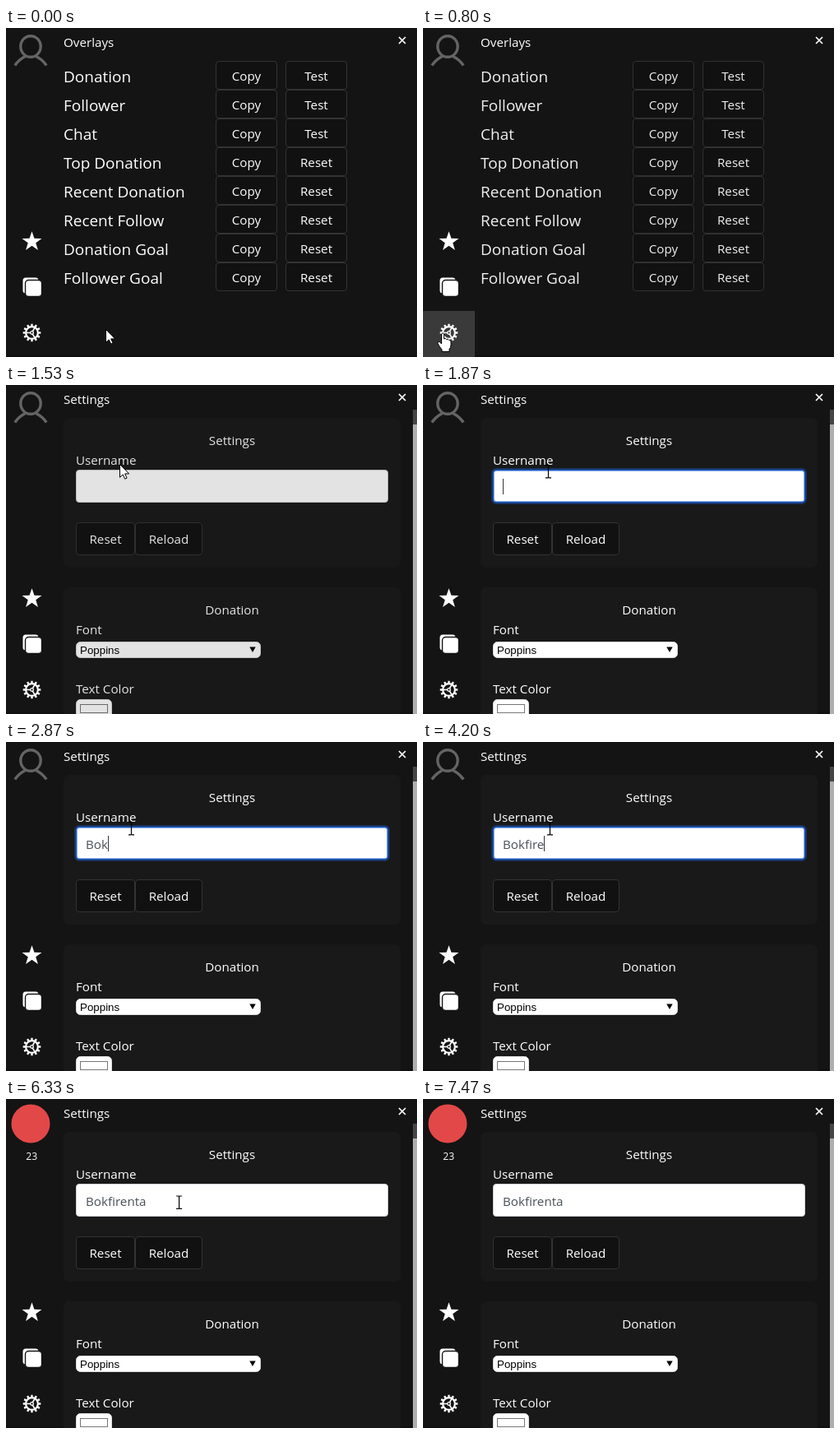
These frames come from a looping animation (500x400 px, 8.14 s). An HTML page:

```html
<!DOCTYPE html>
<html lang="en">
<head>
<meta charset="utf-8">
<title>Overlay settings</title>
<style>
  html, body { margin: 0; width: 100%; height: 100%; overflow: hidden; background: #141414; }
  svg { display: block; width: 500px; height: 400px; }
  text { font-family: "Open Sans", "Noto Sans", sans-serif; font-size: 15.2px; fill: #fff; }
  .mid { text-anchor: middle; }
  .label { font-size: 19px; }
  .btn { fill: #111; stroke: #333; }
  .card { fill: #191919; }
  .pen { fill: none; stroke: #fff; }
  .pointer { fill: #fff; stroke: #000; stroke-width: 1; stroke-linejoin: round; }
</style>
</head>
<body>
<svg viewBox="0 0 500 400">
  <rect width="500" height="400" fill="#141414"/>
  <rect y="398" width="500" height="2" fill="#0f0f0f"/>
  <rect id="hover" y="344" width="63" height="56" fill="#3a3a3a"/>

  <g id="guest" fill="none" stroke="#646464" stroke-width="3.4">
    <ellipse cx="30" cy="22.5" rx="12.2" ry="12.8"/>
    <path d="M10.8 45.5Q16 38 23.5 34.5M49.2 45.5Q44 38 36.5 34.5"/>
  </g>
  <circle id="avatar" cx="30" cy="30" r="23.5" fill="#e34848"/>
  <text id="count" class="mid" x="31.2" y="74" style="font-size:12.2px">23</text>

  <path id="star" fill="#fff"/>
  <rect x="20.5" y="303.5" width="19" height="19" rx="3.5" fill="#fff"/>
  <rect x="23.5" y="306.5" width="20" height="20" rx="4" fill="#fff" stroke="#141414" stroke-width="1.4"/>
  <g class="pen" transform="translate(31.5 370.5)">
    <circle r="7.4" stroke-width="2.2"/>
    <path id="teeth" stroke-width="2.4"/>
    <path id="spokes" stroke-width="1.7"/>
    <circle r="1.8" stroke-width="1.3"/>
  </g>
  <path class="pen" stroke-width="1.7" d="M478 11l8 8M486 11l-8 8"/>
  <text id="title" x="70" y="23"></text>

  <g id="overlays"></g>

  <g id="settings">
    <rect class="card" x="70" y="40" width="410" height="182" rx="7"/>
    <rect class="card" x="70" y="246" width="410" height="170" rx="7"/>
    <text class="mid" x="275" y="73">Settings</text>
    <text x="85" y="97">Username</text>
    <g id="glow" fill="none">
      <rect x="83.5" y="101.5" width="383" height="43" rx="5" stroke="#1b4fae" stroke-opacity=".45"/>
    </g>
    <rect id="field" x="85.5" y="103.5" width="379" height="39" rx="3.5" fill="#fff"/>
    <text id="name" x="97" y="130" style="fill:#495057"></text>
    <rect id="caret" y="114" width="1" height="19" fill="#30363c"/>
    <g id="actions"></g>
    <text class="mid" x="275" y="279">Donation</text>
    <text x="85" y="303">Font</text>
    <rect x="85.5" y="312.5" width="224" height="19" rx="5" fill="#fff" stroke="#ddd"/>
    <text x="90" y="327" style="font:13.333px 'Liberation Sans',Arial,sans-serif;fill:#000">Poppins</text>
    <path d="M296.3 318.5h7.4l-3.7 6.6z"/>
    <text x="85" y="375">Text Color</text>
    <rect x="85.5" y="382.5" width="43" height="30" rx="5" fill="#fff" stroke="#ddd"/>
    <rect x="90.5" y="388.5" width="33" height="10" fill="#fff" stroke="#777"/>
  </g>
  <g id="scroll">
    <rect x="495" y="30" width="5" height="18" fill="#454545"/>
    <rect x="495" y="48" width="5" height="352" fill="#aeaeae"/>
  </g>

  <g id="cursor">
    <path id="arrow" class="pointer" d="M.5 .5V16.3L4.2 12.9L6.7 18.2L9.1 17.1L6.7 11.9H11.7Z"/>
    <path id="beam" fill="none" stroke="#000" stroke-width="1.2" d="M-3.5-7.5h2.5q1 0 1 1q0-1 1-1h2.5M0-7V7.5M-3.5 7.8h2.5q1 0 1-1q0 1 1 1h2.5"/>
    <path id="hand" class="pointer" d="M-1.5 13V1Q0-1.5 1.6 1V7Q3.5 5.5 4.6 7.6Q6.6 6.4 7.6 8.5Q9.8 7.8 10 10V15Q9.6 18 8 19.5V22.5H-1V20Q-4.5 16-6 12.5Q-6.3 10-4 10.3Z"/>
  </g>
</svg>
<script>
const LOOP = 8140, STEP = 1000 / 15;
const USER = "Bokfirenta";
const KEYS = [2600, 2800, 2870, 3130, 3400, 3470, 4200, 4330, 4470, 4530];
const FOCUS = 1860, BLUR = 5460, BLINK = 530;
const SWITCH = 1315;

// time, x, y, eased on the way in
const PATH = [
  [0, 121, 366], [200, 121, 366], [600, 24, 371, 1], [867, 24, 371],
  [1267, 124, 181], [1533, 138, 96], [1600, 146, 89], [1733, 152.5, 105],
  [3700, 152.5, 105], [3733, 154.5, 105], [4867, 154.5, 105],
  [5200, 334, 174, 1], [6133, 334, 174], [6600, 21, 51, 1],
  [6933, 21, 51], [7440, 88, 359, 1], [LOOP, 88, 359]
];

const $ = id => document.getElementById(id);
const clamp = v => Math.max(0, Math.min(1, v));
const show = (id, on) => $(id).setAttribute("visibility", on ? "visible" : "hidden");
const polar = (r, deg) => {
  const a = deg * Math.PI / 180;
  return (r * Math.sin(a)).toFixed(2) + " " + (-r * Math.cos(a)).toFixed(2);
};
const rays = (n, r0, r1, turn) =>
  Array.from({ length: n }, (_, i) => `M${polar(r0, turn + i * 360 / n)}L${polar(r1, turn + i * 360 / n)}`).join("");
const button = (x, y, w, h, s) =>
  `<rect class="btn" x="${x + .5}" y="${y + .5}" width="${w - 1}" height="${h - 1}" rx="3.5"/>` +
  `<text class="mid" x="${x + w / 2}" y="${y + h / 2 + 6}">${s}</text>`;

function build() {
  const rows = ["Donation", "Follower", "Chat", "Top Donation", "Recent Donation",
    "Recent Follow", "Donation Goal", "Follower Goal"];
  $("overlays").innerHTML = rows.map((s, i) => {
    const y = 40 + 35 * i;
    return `<text class="label" x="70" y="${y + 26}">${s}</text>` +
      button(255, y, 75, 35, "Copy") + button(340, y, 75, 35, i < 3 ? "Test" : "Reset");
  }).join("");
  $("actions").innerHTML = button(85, 167, 72, 40, "Reset") + button(157, 167, 82, 40, "Reload");
  $("star").setAttribute("d", "M" + Array.from({ length: 10 }, (_, i) => polar(i % 2 ? 5 : 12.6, i * 36)).join("L") + "Z");
  $("star").setAttribute("transform", "translate(31.5 259.8)");
  $("teeth").setAttribute("d", rays(12, 8, 10.8, 0));
  $("spokes").setAttribute("d", rays(3, 1.8, 7, 30));
}

function cursorAt(t) {
  let i = 1;
  while (i < PATH.length - 1 && PATH[i][0] < t) i++;
  const [t0, x0, y0] = PATH[i - 1], [t1, x1, y1, eased] = PATH[i];
  let k = clamp((t - t0) / (t1 - t0));
  if (eased) k = k * k * (3 - 2 * k);
  return [x0 + (x1 - x0) * k, y0 + (y1 - y0) * k];
}

function drawCursor(t) {
  const [x, y] = cursorAt(t);
  const overGear = x < 63 && y > 344;
  const overField = t > SWITCH && x > 85 && x < 465 && y > 103 && y < 143;
  const seen = t < 7460;
  $("cursor").setAttribute("transform", `translate(${x.toFixed(1)} ${y.toFixed(1)})`);
  show("hand", seen && overGear);
  show("beam", seen && overField);
  show("arrow", seen && !overGear && !overField);
  show("hover", seen && overGear);
}

function drawField(t) {
  const typed = KEYS.filter(k => k <= t + 4).length;
  const focused = t >= FOCUS && t < BLUR;
  const last = typed ? KEYS[typed - 1] : FOCUS;
  const name = $("name");
  name.textContent = USER.slice(0, typed);
  $("caret").setAttribute("x", Math.round(97 + (typed ? name.getComputedTextLength() : 0)));
  show("caret", focused && Math.floor((t - last + 4) / BLINK) % 2 === 0);
  show("glow", focused);
  $("field").setAttribute("stroke", focused ? "#1d5cc9" : "#ced4da");
  $("field").setAttribute("stroke-width", focused ? 2 : 1);
}

function draw(ms) {
  const t = Math.floor((ms % LOOP + 4) / STEP) * STEP;
  const later = t >= SWITCH;
  $("title").textContent = later ? "Settings" : "Overlays";
  $("overlays").setAttribute("opacity", clamp(1 - (t - 765) / 550));
  $("settings").setAttribute("opacity", clamp((t - SWITCH) / 247));
  $("settings").setAttribute("display", later ? "inline" : "none");
  show("scroll", later);
  show("guest", t < 5660);
  show("avatar", t >= 5660);
  show("count", t >= 5730);
  if (later) drawField(t);
  drawCursor(t);
}

build();
const start = performance.now();
function tick() {
  draw(performance.now() - start);
  requestAnimationFrame(tick);
}
tick();
</script>
</body>
</html>
```
